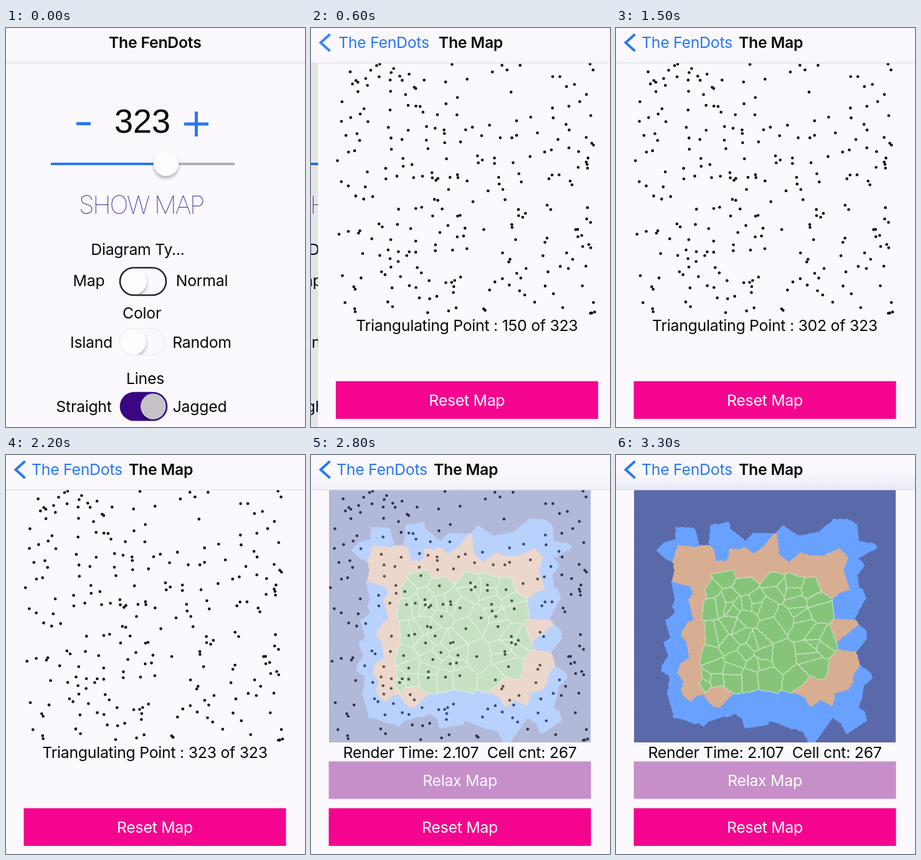
Recreate the animation shown at these times as an HTML page with a canvas. Size 480x640 px, loop 3.5 s.

```html
<!DOCTYPE html>
<html lang="en">
<head>
<meta charset="utf-8">
<title>Island map</title>
<style>
html, body { margin: 0; width: 100%; height: 100%; overflow: hidden; background: #fbf9fd }
canvas { display: block }
</style>
</head>
<body>
<canvas id="stage" width="480" height="640"></canvas>
<script>
const LOOP = 3500, STEP = 100, TOTAL = 323, CELLS = 267;
const APP = 'The FenDots', SCREEN = 'The Map';
const PAPER = '#fbf9fd', BLUE = '#2878f4', INK = '#08070a';
const MAP = { x: 29, y: 56, w: 420, h: 405 };
const ctx = stage.getContext('2d');

let seed = 2024;
const random = () => (seed = seed * 16807 % 2147483647) / 2147483647;
const clamp = v => Math.max(0, Math.min(1, v));

const sites = Array.from({ length: CELLS }, () =>
  [MAP.x + 2 + random() * (MAP.w - 6), MAP.y + random() * (MAP.h - 2)]);

// Voronoi cell: cut the map by the bisector to every other site
function cell(site) {
  const right = MAP.x + MAP.w, bottom = MAP.y + MAP.h;
  let poly = [[MAP.x, MAP.y], [right, MAP.y], [right, bottom], [MAP.x, bottom]];
  for (const other of sites) {
    if (other === site) continue;
    const dx = other[0] - site[0], dy = other[1] - site[1];
    const side = p => (p[0] - (site[0] + other[0]) / 2) * dx + (p[1] - (site[1] + other[1]) / 2) * dy;
    poly = poly.flatMap((p, i) => {
      const q = poly[(i + 1) % poly.length], a = side(p), b = side(q), out = a <= 0 ? [p] : [];
      if (a * b < 0) {
        const k = a / (a - b);
        out.push([p[0] + (q[0] - p[0]) * k, p[1] + (q[1] - p[1]) * k]);
      }
      return out;
    });
  }
  return poly;
}

// The jag depends on position only, so neighbouring cells share their edge
function jagged(poly) {
  const path = new Path2D();
  poly.forEach(([x, y], i) => {
    const [nx, ny] = poly[(i + 1) % poly.length];
    const parts = Math.ceil(Math.hypot(nx - x, ny - y) / 3);
    for (let k = 0; k < parts; k++) {
      const px = x + (nx - x) * k / parts, py = y + (ny - y) * k / parts;
      path.lineTo(px + .8 * Math.sin(2 * px + 3 * py), py + .8 * Math.sin(3 * px - 2 * py));
    }
  });
  path.closePath();
  return path;
}

// Terrain bands nest as boxes around the middle of the island
function terrain([x, y]) {
  const within = (w, h) => Math.abs(x - 240) < w && Math.abs(y - 277) < h;
  return within(98, 92) ? '#86c47a' : within(128, 118) ? '#d8ae92' : within(160, 152) ? '#68a1ff' : '#5969a9';
}

const island = document.createElement('canvas');
island.width = 480;
island.height = 640;
{
  const c = island.getContext('2d');
  c.rect(MAP.x, MAP.y, MAP.w, MAP.h);
  c.clip();
  c.fillStyle = '#5969a9';
  c.fillRect(0, 0, 480, 640);
  const cells = sites.map(s => ({ color: terrain(s), path: jagged(cell(s)) }));
  for (const { color, path } of cells) {
    c.fillStyle = c.strokeStyle = color;
    c.fill(path);
    c.stroke(path);
  }
  c.strokeStyle = '#c3e4b9';
  c.lineWidth = 1.2;
  for (const { color, path } of cells) if (color === '#86c47a') c.stroke(path);
}

function text(str, x, y, { color = INK, weight = 400, size = 24.8, align = 'center', family = 'Inter', track = -.25 } = {}) {
  ctx.font = `${weight} ${size}px ${family}, sans-serif`;
  ctx.letterSpacing = track + 'px';
  ctx.textAlign = align;
  ctx.fillStyle = color;
  ctx.fillText(str, x, y);
}

function rect(x, y, w, h, color) {
  ctx.fillStyle = color;
  ctx.fillRect(x, y, w, h);
}

function faded(alpha, draw) {
  ctx.save();
  ctx.globalAlpha *= clamp(alpha);
  draw();
  ctx.restore();
}

function knob(x, y, r, color) {
  ctx.save();
  ctx.shadowColor = 'rgba(0,0,0,.3)';
  ctx.shadowBlur = 5;
  ctx.shadowOffsetY = 3.5;
  ctx.fillStyle = color;
  ctx.beginPath();
  ctx.arc(x, y, r, 0, 7);
  ctx.fill();
  ctx.restore();
}

function toggle(x, y, w, h, line, fill, knobX, knobColor) {
  const pill = new Path2D();
  pill.roundRect(x, y, w, h, h / 2);
  ctx.fillStyle = fill;
  ctx.fill(pill);
  ctx.save();
  ctx.clip(pill);
  knob(knobX, y + h / 2, 21, knobColor);
  ctx.restore();
  ctx.strokeStyle = line;
  ctx.lineWidth = 2.6;
  ctx.stroke(pill);
}

function settings(t) {
  rect(0, 0, 480, 640, PAPER);
  rect(113, 151, 23, 5, BLUE);
  rect(286, 151.5, 39, 5, BLUE);
  rect(303, 134, 5, 40, BLUE);
  text(TOTAL, 219, 168, { size: 54, family: '"Liberation Sans"', track: 0 });

  rect(72, 216, 180, 4, BLUE);
  rect(260, 216, 107, 4, '#b3b1b6');
  knob(257, 217, 20.5, '#fdfcfe');
  faded(t < 100 ? 1 : .25 + (t - 100) / 600, () =>
    text('SHOW MAP', 217, 298, { color: '#1c0d80', weight: 100, size: 40, track: -2.2 }));

  text('Diagram Ty...', 211.5, 364);
  text('Map', 133, 414);
  text('Normal', 314.5, 414);
  text('Color', 218, 466);
  text('Island', 137, 513);
  text('Random', 314.5, 513);
  text('Lines', 223.5, 571);
  text('Straight', 125, 616);
  text('Jagged', 311, 616);
  toggle(183, 384.5, 74, 44, '#29272e', PAPER, 205, '#fdfcfe');
  toggle(182, 482, 73, 43, '#f3f1f5', PAPER, 204, '#fdfcfe');
  toggle(184, 585, 74, 44, '#3a0783', '#3a0783', 237, '#c5c3c7');
}

function button(label, y, h, color) {
  rect(28.5, y, 421, h, color);
  text(label, 239, y + 39.5, { color: '#fff' });
}

function mapScreen(t, reveal) {
  rect(0, 0, 480, 640, PAPER);
  ctx.fillStyle = INK;
  for (const [x, y] of sites) {
    ctx.beginPath();
    ctx.arc(x, y, 2.3, 0, 7);
    ctx.fill();
  }
  faded(reveal, () => ctx.drawImage(island, 0, 0));
  if (reveal > 0) {
    text('Render Time: 2.107  Cell cnt: 267', 239, 486);
    button('Relax Map', 491.5, 60, '#c68fca');
  } else {
    // Counting slows down as the triangulation grows
    const count = Math.round(339 - 727e-7 * (2213 - t) ** 2);
    text(`Triangulating Point : ${Math.max(0, Math.min(TOTAL, count))} of ${TOTAL}`, 239, 486);
  }
  button('Reset Map', 566.5, 60.5, '#f5048f');
}

function navBar(p, reveal) {
  rect(0, 0, 480, 56, '#faf8fc');
  faded(reveal, () => {
    const tint = ctx.createLinearGradient(0, 28, 0, 56);
    tint.addColorStop(0, 'rgba(110,125,220,0)');
    tint.addColorStop(1, 'rgba(110,125,220,.12)');
    rect(0, 28, 480, 28, tint);
  });
  rect(0, 55.5, 480, 1, '#dcdadf');

  const left = 41 + 124 * (1 - p), bold = { weight: 600, align: 'left' };
  faded(1 - p * 1.25, () => text(APP, left, 32, bold));
  faded(p * 1.1, () => text(APP, left, 32, { color: BLUE, align: 'left' }));
  faded(p * 1.1, () => text(SCREEN, 197 + 330 * (1 - p), 32, bold));
  faded((p - .75) * 4, () => {
    ctx.strokeStyle = BLUE;
    ctx.lineWidth = 4;
    ctx.beginPath();
    ctx.moveTo(30.5, 10);
    ctx.lineTo(15.5, 23.5);
    ctx.lineTo(30.5, 37);
    ctx.stroke();
  });
}

function draw(t) {
  // Critically damped push from the settings to the map
  const s = Math.max(0, t - 156) * .0127;
  const p = t > 1000 ? 1 : 1 - (1 + s) * Math.exp(-s);
  const f = clamp((t - 2420) / 820), reveal = f * f * (3 - 2 * f);

  ctx.save();
  ctx.translate(-144 * p, 0);
  settings(t);
  ctx.restore();
  rect(0, 0, 480, 640, `rgba(0,0,0,${.09 * p})`);
  ctx.save();
  ctx.translate(480 * (1 - p), 0);
  mapScreen(t, reveal);
  ctx.restore();
  navBar(p, reveal);
}

const start = performance.now();
function tick() {
  const t = (performance.now() - start) % LOOP;
  draw(Math.floor(t / STEP) * STEP);
  requestAnimationFrame(tick);
}
tick();
</script>
</body>
</html>
```
